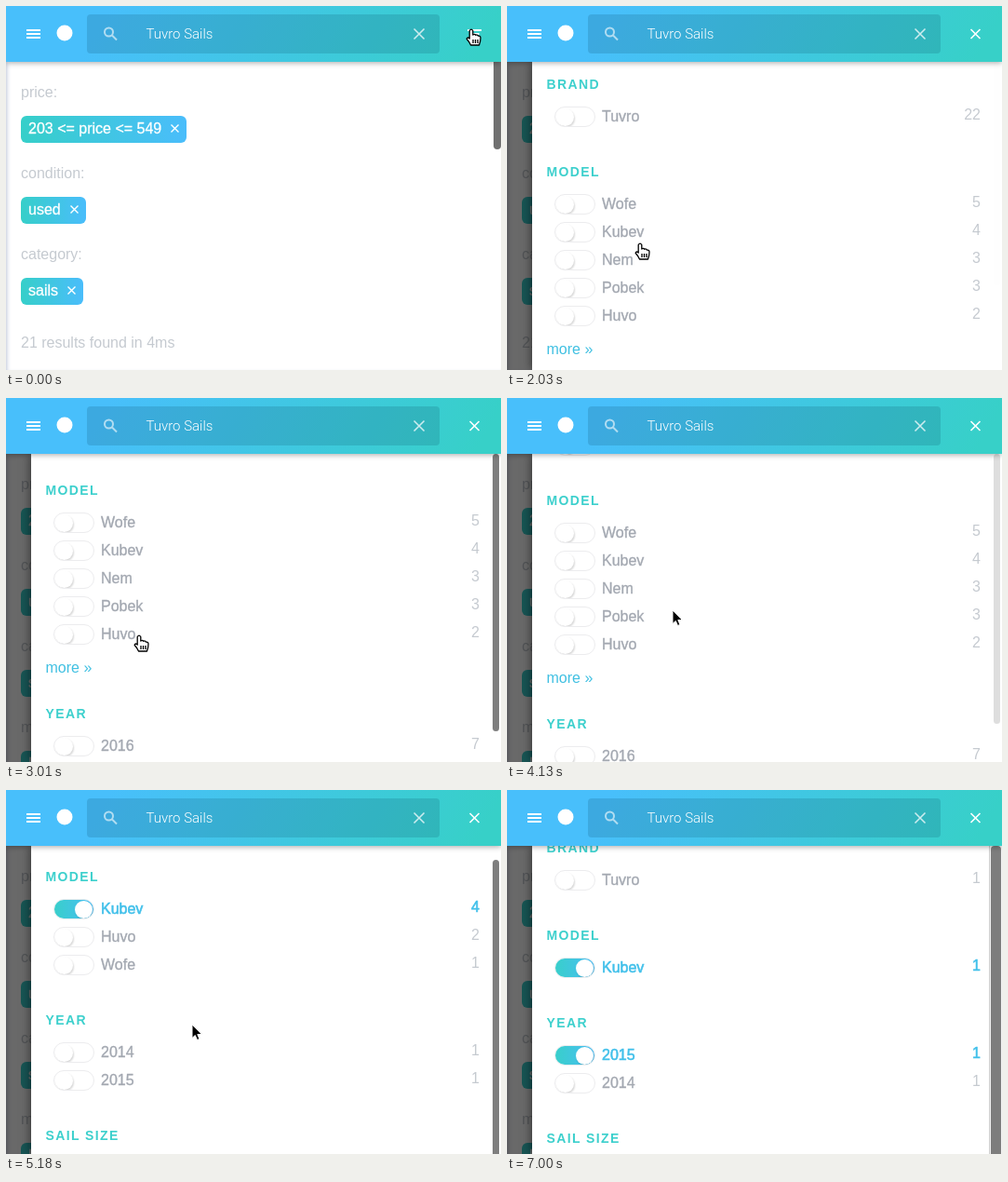
Write an HTML page that moves like this. It is 532x391 px and loops after 7.14 s.

```html
<!DOCTYPE html>
<html lang="en">
<head>
<meta charset="utf-8">
<title>Search filters</title>
<style>
  html, body { margin: 0; width: 100%; height: 100%; overflow: hidden; background: #fff; }
  body { position: relative; font: 16px/20px "Liberation Sans", Arial, sans-serif; white-space: nowrap; color: #c5cad0; }
  div, span, svg { position: absolute; box-sizing: border-box; }
  svg { overflow: visible; left: 0; top: 0; }
  #header { left: 0; top: 0; width: 532px; height: 60px; box-shadow: 0 1px 6px rgba(0,0,0,.35);
    background: linear-gradient(120deg, #48bffb 20%, #37d0c8 95%); }
  #search { left: 87px; top: 9px; width: 379px; height: 42px; border-radius: 4px; background: rgba(0,60,80,.16); }
  #query { left: 150.5px; top: 20px; color: #fff; font: 300 15px/20px Roboto, "Liberation Sans", sans-serif; }
  #page, #dim { left: 0; top: 0; width: 532px; height: 391px; }
  #page { box-shadow: inset 4px 0 4px -3px rgba(90,110,160,.4); }
  #dim { background: #000; }
  .chip { left: 16px; height: 29px; padding: 4px 27px 0 8px; border-radius: 6px; color: #fff;
    -webkit-text-stroke: .3px; background: linear-gradient(90deg, #36cfc9, #4abdfb); }
  .chip svg { left: auto; right: 8px; top: 9px; }
  #drawer { top: 60px; width: 505px; height: 331px; background: #fff; box-shadow: 0 0 10px rgba(0,0,0,.6); }
  #clip { inset: 0; overflow: hidden; }
  #list { left: 0; top: -60px; width: 505px; }
  .title { left: 15.5px; font-weight: bold; font-size: 14px; letter-spacing: 1.4px; color: #3dd0cd; }
  .more { left: 15.5px; margin-top: 1px; color: #40c0e2; }
  .row { left: 0; width: 505px; height: 20px; }
  .label { left: 75px; top: 1px; color: #a3a8b1; -webkit-text-stroke: .35px; }
  .count { right: 23px; top: -1px; }
  .on .label, .on .count { color: #42c0ea; -webkit-text-stroke: .6px; }
  .toggle { left: 24px; top: 0; width: 44px; height: 22px; border: 1px solid #ececee; border-radius: 11px; overflow: hidden; }
  .fill { inset: -1px; opacity: var(--p); background: linear-gradient(90deg, #38cfca, #4abdf5); }
  .knob { left: calc(1px + var(--p) * 21px); top: .5px; width: 19px; height: 19px; border-radius: 50%;
    background: #fff; box-shadow: 1px 1.5px 2px rgba(0,0,0,.16); }
  #thumb, #pageThumb { background: #707070; }
  #thumb { border-radius: 4px; }
  #pageThumb { left: 524px; top: 60px; width: 8px; height: 94px; border-radius: 0 0 4px 4px; }
  #track { left: 518px; top: 60px; width: 14px; height: 331px; background: #f4f4f4; border-left: 1px solid #ccc; }
</style>
</head>
<body>
<div id="page"></div>
<div id="pageThumb"></div>
<div id="dim"></div>
<div id="drawer"><div id="clip"><div id="list"></div></div></div>
<div id="track"></div>
<div id="thumb"></div>
<div id="header">
  <div id="search"></div>
  <span id="query">Tuvro Sails</span>
  <svg width="532" height="60" fill="none" stroke="#fff" stroke-width="2">
    <path d="M22 26h15M22 30h15M22 34h15" stroke-width="1.800"/>
    <circle cx="63" cy="29" r="8.5" fill="#fff" stroke="none"/>
    <g opacity=".6"><circle cx="110.5" cy="28" r="4.5"/><path d="M114 31.5l5 5"/></g>
    <path d="M438.500 24.500l11 11m0-11l-11 11" stroke-width="1.600" opacity=".75"/>
    <path id="filterIcon" d="M496 26h15M498.500 30h10M501 34h5"/>
    <path id="closeIcon" d="M498.500 25l10 10m0-10l-10 10" stroke-width="1.600"/>
  </svg>
</div>
<svg id="cursor" width="20" height="22" stroke-linejoin="round">
  <path id="hand" fill="#fff" stroke="#000" stroke-width="1.300"
    d="M-1.800 1.500Q0-1.200 1.800 1.500V6Q3.500 4.500 4.800 6.300Q6.500 5.300 7.500 7.200Q10 6.500 10 9.500Q10 13 8.500 17H-.5Q-2 13.500-4.800 10.500Q-4.800 7.800-1.800 10ZM2 11v4M4.500 11v4M7 11v4"/>
  <path id="arrow" fill="#000" stroke="#fff" d="M0 0V14.500L3.300 11.500L5.500 16.500L8 15.500L5.800 10.500H10.500Z"/>
</svg>
<script>
const LOOP = 7140;
const $ = id => document.getElementById(id);
const clamp = v => Math.min(1, Math.max(0, v));
const ramp = (t, from, to) => clamp((t - from) / (to - from));
const ease = u => u < .5 ? 2 * u * u : 1 - 2 * (1 - u) ** 2;

// Eased value at t along [time, value] points
function along(points, t) {
  let value = points[0][1];
  for (let i = 1; i < points.length; i++) {
    const u = ease(ramp(t, points[i - 1][0], points[i][0]));
    value += (points[i][1] - points[i - 1][1]) * u;
  }
  return value;
}

const sections = (models, years, more) => [
  { title: 'BRAND', rows: [['Tuvro', more ? 22 : models.length > 1 ? 4 : 1]] },
  { title: 'MODEL', rows: models, more },
  { title: 'YEAR', rows: years },
  { title: 'SAIL SIZE', rows: [] }
];
const LISTS = [
  sections([['Wofe', 5], ['Kubev', 4], ['Nem', 3], ['Pobek', 3], ['Huvo', 2]],
    [['2016', 7], ['2015', 6], ['2014', 5]], true),
  sections([['Kubev', 4], ['Huvo', 2], ['Wofe', 1]], [['2014', 1], ['2015', 1]]),
  sections([['Kubev', 1]], [['2015', 1], ['2014', 1]])
];
// Visible share of each list, which sets the scroll thumb
const THUMB_RATIO = [.73, .88, .95];

function listHTML(list) {
  let y = 84, html = '';
  const at = () => `style="top:${y - 10}px"`;
  for (const { title, rows, more } of list) {
    html += `<span class="title" ${at()}>${title}</span>`;
    y += 34;
    for (const [name, count] of rows) {
      html += `<div class="row" data-name="${name}" ${at()}>
        <div class="toggle"><div class="fill"></div><div class="knob"></div></div>
        <span class="label">${name}</span><span class="count">${count}</span></div>`;
      y += 30;
    }
    if (more) {
      y += 6;
      html += `<span class="more" ${at()}>more »</span>`;
      y += 50;
    } else y += 30;
  }
  return html;
}

function pageHTML(withModel) {
  const filters = [['price', '203 &lt;= price &lt;= 549'], ['condition', 'used'], ['category', 'sails']];
  if (withModel) filters.push(['model', 'Kubev']);
  const cross = '<svg width="9" height="9" stroke="#fff" stroke-width="1.4"><path d="M.5.5l8 8m0-8l-8 8"/></svg>';
  return filters.map(([name, value], i) =>
    `<span style="left:16px;top:${82.5 + i * 87}px">${name}:</span>
     <div class="chip" style="top:${118 + i * 87}px">${value}${cross}</div>`).join('') +
    `<span style="left:16px;top:${91 + filters.length * 87}px">21 results found in 4ms</span>`;
}

const shown = {};
function fill(id, key, html) {
  if (shown[id] === key) return;
  shown[id] = key;
  $(id).innerHTML = html();
}

const SCROLL = [[2030, 0], [2730, 79], [3360, 79], [3700, 68], [4620, 68], [4900, 85], [6650, 85], [6930, 22]];
const CURSOR_X = [[840, 500], [1540, 110], [1610, 110], [1890, 143], [3360, 143], [4060, 178], [4130, 178],
  [4340, 73], [4620, 73], [5110, 200], [5390, 200], [6090, 73], [6300, 73], [6510, 150], [6650, 150], [6950, 548]];
const CURSOR_Y = [[70, 25], [490, 28.5], [840, 28.5], [1540, 165], [1610, 165], [1890, 255], [3360, 255], [4060, 228],
  [4130, 228], [4340, 172], [4620, 172], [5110, 252], [5390, 252], [6090, 308], [6650, 308], [6950, 340]];

function draw(t) {
  const open = ease(ramp(t, 70, 776));
  const step = t < 4620 ? 0 : t < 6650 ? 1 : 2;
  const scroll = along(SCROLL, t);

  fill('page', t >= 2800, () => pageHTML(t >= 2800));
  $('dim').style.opacity = .59 * open;
  $('pageThumb').style.opacity = 1 - ramp(t, 70, 280);
  $('drawer').style.left = 532 - 505 * open + 'px';
  $('drawer').style.visibility = open ? 'visible' : 'hidden';

  fill('list', step, () => listHTML(LISTS[step]));
  $('list').style.transform = `translateY(${-Math.round(scroll)}px)`;
  const active = { Kubev: ramp(t, 4340, 4480), 2015: ramp(t, 6160, 6300) };
  for (const row of $('list').querySelectorAll('.row')) {
    const p = active[row.dataset.name] || 0;
    row.style.setProperty('--p', p);
    row.classList.toggle('on', p > .5);
  }

  const wide = t >= 6860;
  const ratio = THUMB_RATIO[step];
  const top = Math.max(60, scroll * ratio);
  const visible = t < 4620 ? ramp(t, 2030, 2170) * (1 - ramp(t, 4030, 4165))
    : t < 6650 ? 1 - ramp(t, 5390, 5700) : 1;
  $('track').style.visibility = wide ? 'visible' : 'hidden';
  Object.assign($('thumb').style, {
    left: (wide ? 520 : 523) + 'px', width: (wide ? 11 : 7) + 'px', top: top + 'px',
    height: (scroll + 411) * ratio - top + 'px', opacity: visible * .9
  });

  $('filterIcon').style.opacity = 1 - ramp(t, 210, 490);
  $('closeIcon').style.opacity = ramp(t, 350, 770);

  const x = along(CURSOR_X, t), y = along(CURSOR_Y, t);
  const isHand = y < 60 || x < 150;
  $('cursor').style.transform = `translate(${x}px,${y}px)`;
  $('hand').style.display = isHand ? '' : 'none';
  $('arrow').style.display = isHand ? 'none' : '';
}

function tick() {
  draw(performance.now() % LOOP);
  requestAnimationFrame(tick);
}
tick();
</script>
</body>
</html>
```
